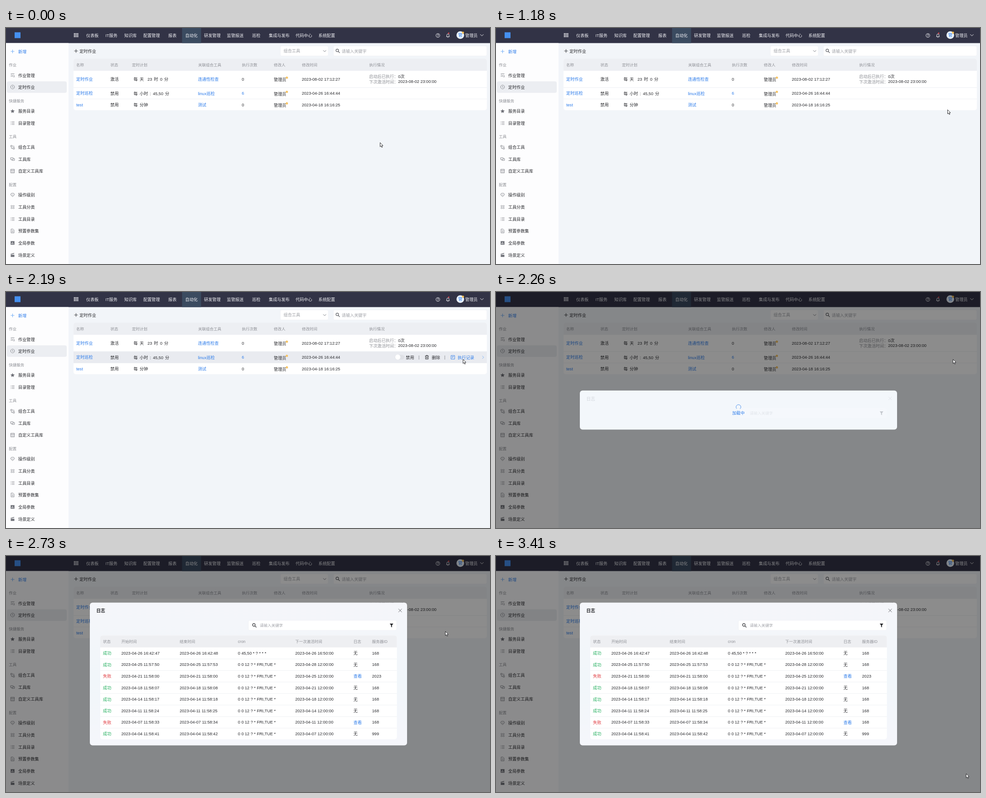
Write an HTML page that moves like this. It is 1068 by 524 pixels and loops after 3.49 s.

```html
<!DOCTYPE html>
<html lang="zh">
<head>
<meta charset="utf-8">
<title>定时作业</title>
<style>
html, body { margin: 0; width: 100%; height: 100%; overflow: hidden; background: #f2f5f9; }
svg { display: block; font-family: "Liberation Sans", "Noto Sans CJK SC", "Noto Sans CJK", sans-serif; }
</style>
</head>
<body>
<svg id="stage" width="1068" height="524" viewBox="0 0 1068 524"></svg>
<script>
const INK = '#28292d', GRAY = '#8d8f95', BLUE = '#2b7bea', LINE = '#e9ebef', HOVER = '#e9ebf0';

// y is the vertical centre of the text
const text = (s, x, y, fill = INK, size = 9.15, more = '') =>
  `<text x="${x}" y="${y + size * .37}" font-size="${size}" fill="${fill}" ${more}>${s}</text>`;
const rect = (x, y, w, h, fill, r = 0, more = '') =>
  `<rect x="${x}" y="${y}" width="${w}" height="${h}" rx="${r}" fill="${fill}" ${more}/>`;
const dot = (x, y, r, fill, more = '') => `<circle cx="${x}" cy="${y}" r="${r}" fill="${fill}" ${more}/>`;
const line = (d, color, w = .9) => `<path d="${d}" fill="none" stroke="${color}" stroke-width="${w}"/>`;
const solid = (d, color) => `<path d="${d}" fill="${color}" fill-rule="evenodd"/>`;
const at = (x, y, s) => `<g transform="translate(${x} ${y})">${s}</g>`;
const group = (id, s) => `<g id="${id}">${s}</g>`;

const badge = (x, y) => dot(x, y, 2.4, '#f2b23c') + dot(x, y, .9, '#fff0c8');
const cross = (x, y, c) => line(`M${x - 3.7} ${y - 3.7}l7.4 7.4m0-7.4l-7.4 7.4`, c);
const lens = (x, y, c) => line(`M${x + 1.2} ${y + 1.2}l3.3 3.3`, c, 1.2) +
  dot(x - 1, y - 1, 2.9, 'none', `stroke="${c}" stroke-width="1.1"`);
const funnel = (y, c) => solid(`M846.7 ${y - 4}h8l-3 4v4.5l-2-1.2v-3.3z`, c);
const field = (x, y, w) => rect(x, y, w, 22, '#fff', 3, 'stroke="#eceff3" stroke-width=".6"');
const bin = 'M-4-3h8M-1.5-3v-1.3h3V-3M-3-3V4h6V-3M-1-1v3.5M1-1v3.5';
const note = 'M-4-4h8v8h-8zM-2-1.5h4M-2 .8h2.5';

const rows = 'M-1.8-3h6M-1.8 0h6M-1.8 3h6M-4.2-3h1.2M-4.2 0h1.2M-4.2 3h1.2';
const menu = [
  ['作业管理', 105, 'M-4-3.5h8M-4-.5h3.5M-4 2.5h3M2-.5a2 2 0 1 0 .1 0M3.3 2.9l1.2 1.3'],
  ['定时作业', 131, 'M0-4.2a4.2 4.2 0 1 0 .1 0M0-2.3V.3L1.8 1.4'],
  ['服务目录', 184.5, 'M0-4.6L1.4-1.5 4.7-1.2 2.2 1 2.9 4.2 0 2.5-2.9 4.2-2.2 1-4.7-1.2-1.4-1.5Z', 1],
  ['目录管理', 211.2, rows],
  ['组合工具', 264.7, 'M-4-4h3.2v3.2H-4zM1 1h3.2v3.2H1zM1-2.5h2V0M-2.5 .5v2.3H0'],
  ['工具库', 291, 'M-4.3-3h5.5v4h-5.5zM-1.5 1v2h5.8v-4.2H1.5'],
  ['自定义工具库', 317.7, 'M-4-4h8v8h-8zM-4-1.7h8M-2 .3h1.5M.8 .3h1.5M-2 2.3h1.5M.8 2.3h1.5'],
  ['操作级别', 370.8, 'M-2.5-3.8h5L4.5-1 0 4-4.5-1zM-2-1L0 1 2-1'],
  ['工具分类', 397.5, [[-2.2, -2.2], [2.2, -2.2], [-2.2, 2.2], [2.2, 2.2]]
    .map(([x, y]) => `M${x} ${y - 1.5}a1.5 1.5 0 1 0 .1 0`).join('')],
  ['工具目录', 424.2, rows],
  ['预置参数集', 450.7, 'M-3.3-4.3h4.3l2.3 2.3v6.3h-6.6zM-1.6-.8h3.2M-1.6 1.8h3.2'],
  ['全局参数', 477.3, 'M-4.2-4h8.4v8h-8.4zM-2.5 0v2.5h1V0zM-.5-2v4.5h1V-2zM1.5 1v1.5h1V1z', 1],
  ['场景定义', 504, 'M-4-.5h8V4.3h-8zM-4.4-2.2L3.2-4.5 3.8-3-3.8-.9z', 1]
];
const groups = [['作业', 82], ['快捷服务', 161.5], ['工具', 241], ['配置', 347.5]];
const nav = [['仪表板', 177], ['IT服务', 219.5], ['知识库', 261], ['配置管理', 303], ['报表', 358],
  ['自动化', 395.5], ['研发管理', 437], ['监管报送', 487.5], ['巡检', 543], ['集成与发布', 580],
  ['代码中心', 639], ['系统配置', 689.5]];

function topBar() {
  let s = rect(0, 0, 1068, 33.5, '#323346') + rect(388.5, 0, 42, 33.5, '#3b4b60') +
    rect(19, 9.5, 13, 13, '#4590f0');
  for (let i = 0; i < 9; i++) s += rect(149.8 + i % 3 * 3.6, 11.6 + (i / 3 | 0) * 3.2, 2.5, 2.2, '#f2f2f6');
  nav.forEach(([n, x]) => s += text(n, x, 16.2, '#f2f2f6'));
  return s + dot(953, 16.5, 4.1, 'none', 'stroke="#f2f2f6" stroke-width="1"') +
    text('?', 951.1, 16.6, '#f2f2f6', 7, 'font-weight="bold"') +
    line('M971.5 19.3h7.4M972.7 19v-3.2a2.5 2.5 0 0 1 5 0V19M974.3 20.8h1.8', '#f2f2f6', 1) +
    dot(976.8, 11.6, 1.5, '#e5484d') +
    dot(1002.5, 15.8, 8.5, '#e9f1fc') + text('管', 998, 16, BLUE) + badge(1008.3, 10.5) +
    text('管理员', 1013.3, 16.2, '#f2f2f6') + line('M1046.5 14l3.6 3.6 3.6-3.6', '#f2f2f6', 1);
}

function sideBar() {
  let s = rect(0, 33.5, 138, 490.5, '#fdfdfe') + rect(2, 118.5, 132, 25.5, '#eceef2', 4) +
    line('M10.5 52h8m-4-4v8', '#62a5f5') + text('新增', 27, 52.3, BLUE);
  groups.forEach(([n, y]) => s += text(n, 6.3, y, GRAY, 8.5));
  menu.forEach(([n, y, d, full]) =>
    s += at(14.5, y, full ? solid(d, '#6f7178') : line(d, '#7d7f86')) + text(n, 27, y + .2));
  return s;
}

function jobTable() {
  const heads = [['名称', 155], ['状态', 230.5], ['定时计划', 278], ['关联组合工具', 424], ['执行次数', 520.5],
    ['修改人', 591], ['修改时间', 653], ['执行情况', 801.5]];
  const jobs = [
    [113.5, '定时作业', '激活', [['每', 281.5], ['天', 295], ['23', 312.3], ['时', 326.5], ['0', 340], ['分', 349]],
      '连通性检查', '0', '2023-08-02 17:12:27'],
    [145, '定时巡检', '禁用', [['每', 281.5], ['小时', 295], [':', 317.5], ['45,50', 324.2], ['分', 351]],
      'linux巡检', '6', '2023-04-26 16:44:44'],
    [170.6, 'test', '禁用', [['每', 281.5], ['分钟', 295]], '测试', '0', '2023-04-18 16:16:25']
  ];
  let s = line('M150.5 51h8m-4-4v8', INK) + text('定时作业', 162.3, 51.3) +
    field(605.5, 40, 105.5) +
    text('组合工具', 612.5, 50.6, '#9a9ca2') + line('M700 49.5l3.2 3.2 3.2-3.2', '#6f7178', 1) +
    field(722.5, 40, 338.5) +
    lens(732, 50.8, '#55575d') + text('请输入关键字', 740.8, 51.3, '#a0a2a8') +
    rect(149, 68, 912, 114.5, '#fff', 5) +
    solid('M149 95V73a5 5 0 0 1 5-5h902a5 5 0 0 1 5 5v22z', '#edeff3') +
    line('M149 132.2h912M149 157.6h912', LINE, .8) +
    rect(149, 132.2, 912, 25.4, HOVER, 0, 'id="jobHover"');
  heads.forEach(([n, x]) => s += text(n, x, 82.2, GRAY, 8.5));
  jobs.forEach(([y, name, state, plan, tool, count, time]) => {
    s += text(name, 155, y, BLUE) + text(state, 230.3, y + .2) + text(tool, 423.7, y + .2, BLUE) +
      text(count, 520.3, y, count > 0 ? BLUE : INK) + text('管理员', 591, y + 1.2) + badge(619.7, y - 3.2) +
      text(time, 652.7, y);
    plan.forEach(([p, x]) => s += text(p, x, y + .3));
  });
  s += text('启动后已执行：', 801.3, 108, GRAY) + text('0次', 865.2, 107.8) +
    text('下次激活时间：', 801.3, 119.3, GRAY) + text('2023-08-02 23:00:00', 865.2, 119);
  return s + group('actions',
    rect(858, 139.5, 21, 10.5, '#dfe1e6', 5.2) + dot(864.5, 144.5, 5.7, '#fff') +
    text('禁用', 882.3, 145.2) + text('|', 910, 145, '#77797f') +
    at(928.7, 145, line(bin, INK)) + text('删除', 939.5, 145.2) + text('|', 967, 145, '#77797f') +
    at(986, 145, line(note, BLUE)) + text('执行记录', 996.7, 145.2, BLUE) +
    line('M1051 141.8l3.2 3.2-3.2 3.2', '#74aef5'));
}

const LOG_Y = 203, LOG_H = 25.6;

function logDialog() {
  const cols = [214, 254.4, 383.2, 511.8, 638.2, 766.8, 807.8];
  const heads = ['状态', '开始时间', '结束时间', 'cron', '下一次激活时间', '日志', '服务器ID'];
  const logs = [
    ['04-26', '16:42:47', '48', '04-26 16:50', 168], ['04-25', '11:57:50', '53', '04-28 12:00', 168],
    ['04-21', '11:58:00', '00', '04-25 12:00', 2023], ['04-18', '11:58:07', '08', '04-21 12:00', 168],
    ['04-14', '11:58:17', '18', '04-18 12:00', 168], ['04-11', '11:58:24', '25', '04-14 12:00', 168],
    ['04-07', '11:58:33', '34', '04-11 12:00', 168], ['04-04', '11:58:41', '42', '04-07 12:00', 999]
  ];
  let s = rect(185, 103.5, 700, 317, 'url(#paper)', 6) +
    text('日志', 199.2, 121.3, INK, 9.8, 'font-weight="bold"') + cross(869.7, 121, '#55575d') +
    field(535, 143, 327) + lens(548, 154, INK) +
    text('请输入关键字', 560, 154.2, '#a0a2a8', 8.5) + funnel(154, INK) +
    rect(208, 176.5, 654.5, 230.5, '#fff', 5) +
    solid('M208 203v-21.5a5 5 0 0 1 5-5h644.5a5 5 0 0 1 5 5V203z', '#eeeff2') +
    rect(208, LOG_Y, 654.5, LOG_H - .3, HOVER, 0, 'id="logHover"');
  heads.forEach((h, i) => s += text(h, cols[i], 190, GRAY, 8.5));
  logs.forEach(([day, from, sec, next, id], i) => {
    const y = 215.5 + i * LOG_H, fail = i == 2 || i == 6;
    const cells = [fail ? '失败' : '成功', `2023-${day} ${from}`, `2023-${day} ${from.slice(0, 6)}${sec}`,
      i ? '0 0 12 ? * FRI,TUE *' : '0 45,50 * ? * * *', `2023-${next}:00`, fail ? '查看' : '无', id];
    const inks = { 0: fail ? '#e0393e' : '#1fad5b', 5: fail ? BLUE : INK };
    cells.forEach((c, k) => s += text(c, cols[k], y + (k % 5 ? 0 : .3), inks[k]));
    if (i) s += line(`M208 ${LOG_Y + i * LOG_H}h654.5`, LINE, .7);
  });
  return s;
}

const loading = rect(185, 218.8, 700, 86.7, '#f3f7fb', 6) +
  text('日志', 199.2, 237, '#d3d7dd', 9.8) + cross(869.7, 236.3, '#dfe3e8') +
  rect(535, 258, 327, 22, '#f5f8fc', 3) +
  text('请输入关键字', 560, 269.3, '#e1e5ea', 8.5) + funnel(269, '#c4c8ce') +
  line('M531.3 259.2A5.3 5.3 0 1 1 538.2 259.7', BLUE, .8) + text('加载中', 521.2, 268.7, BLUE);

const $ = id => document.getElementById(id);
$('stage').innerHTML = `<defs>
  <linearGradient id="paper" x2="0" y2="1">
    <stop stop-color="#f5f6fa"/><stop offset=".55" stop-color="#f1f6fa"/><stop offset="1" stop-color="#f5f6fb"/>
  </linearGradient></defs>` +
  rect(0, 0, 1068, 524, '#f2f5f9') + topBar() + sideBar() + jobTable() +
  rect(0, 0, 1068, 524, '#000', 0, 'id="mask" opacity=".45"') +
  group('loading', loading) + group('log', logDialog()) +
  dot(1008, 149, 9, '#ff0', 'id="press" opacity=".47"') +
  group('pointer', `<path id="arrow" d="M.5.5V9.7L2.7 7.7 4.2 11.2 5.6 10.6 4.2 7.2H7Z"
    fill="#fff" stroke="#1c1c20" stroke-width=".9"/>` +
    `<path id="beam" d="M-2-5h1.5l.5.5.5-.5H2M0-4.5v9M-2 5h1.5l.5-.5.5.5H2"
    fill="none" stroke="#333" stroke-width=".9"/>`);

const show = (id, on) => $(id).setAttribute('display', on ? 'inline' : 'none');
const move = (id, x, y) => $(id).setAttribute('transform', `translate(${x} ${y})`);

// start time, step length, steps, destination
const moves = [[640, 77, 8, 996, 181], [1255, 75, 6, 1008, 149], [2580, 76, 7, 812, 211], [3200, 70, 4, 1037, 483]];

function pointerAt(t) {
  let x = 825, y = 254;
  for (const [start, step, n, x2, y2] of moves) {
    if (t < start) break;
    const p = Math.min(n, Math.floor((t - start) / step) + 1) / n;
    x += (x2 - x) * p * p * (3 - 2 * p);
    y += (y2 - y) * p;
  }
  return [Math.round(x), Math.round(y)];
}

function draw(now) {
  const t = now % 3490, [x, y] = pointerAt(t);
  const dialog = t >= 2260, log = t >= 2350;
  const jobRow = !dialog && y >= 132 && y < 181;
  const logRow = Math.floor((y - LOG_Y) / LOG_H);
  const onLog = log && x > 208 && x < 862 && logRow >= 0 && logRow < 8;
  const beam = onLog && x > 806 && x < 826;

  show('mask', dialog);
  show('loading', dialog && !log);
  show('log', log);
  for (const id of ['jobHover', 'actions']) {
    show(id, jobRow);
    move(id, 0, y < 158 ? 0 : 25.4);
  }
  show('logHover', onLog);
  move('logHover', 0, logRow * LOG_H);
  show('press', t >= 2020 && t < 2190);
  show('arrow', !beam);
  show('beam', beam);
  move('pointer', x, y);
}

let begin;
function tick(now) {
  begin ??= now;
  draw(now - begin);
  requestAnimationFrame(tick);
}
draw(0);
requestAnimationFrame(tick);
</script>
</body>
</html>
```
